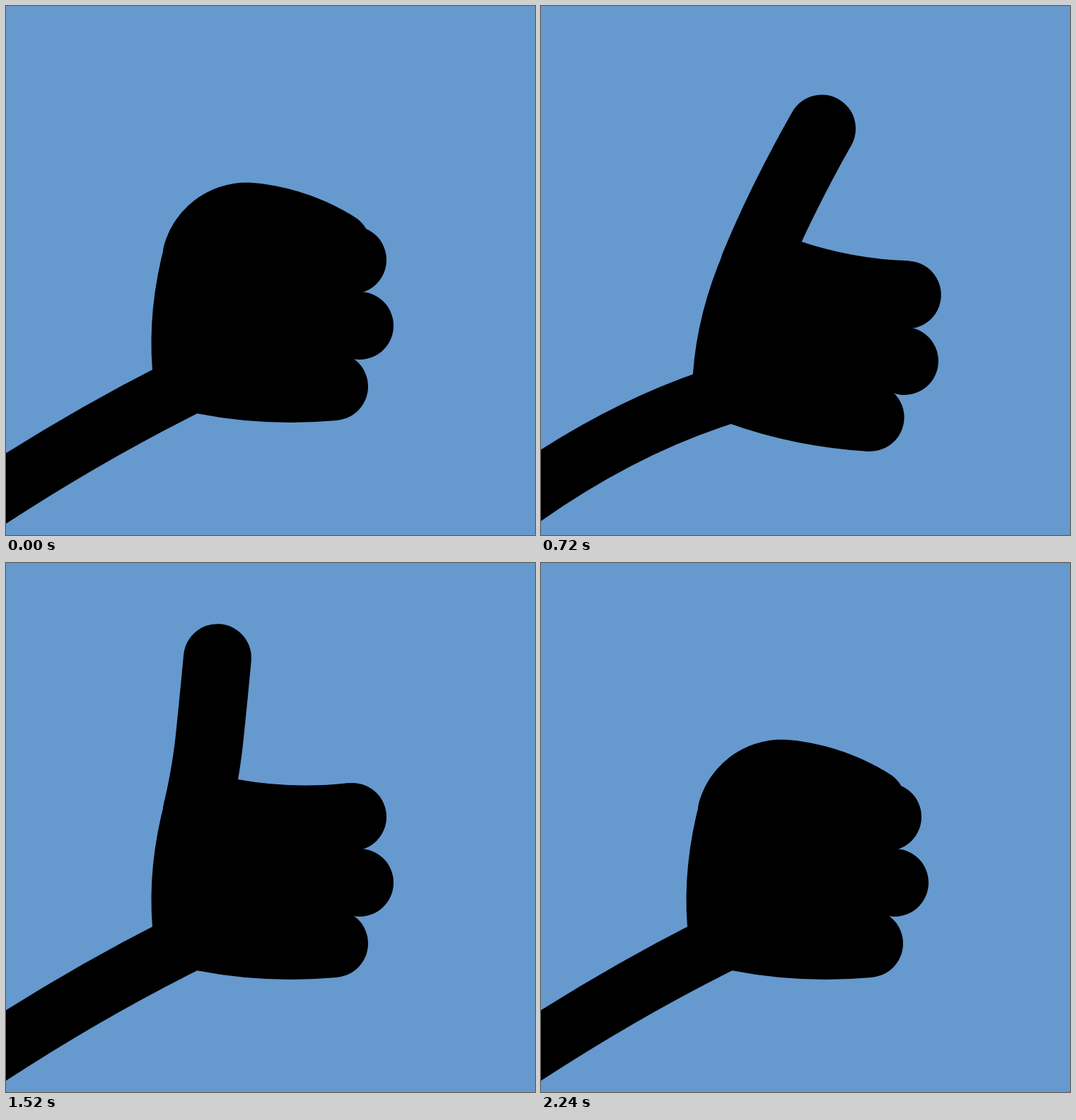
An HTML page with a canvas for the animation above (2280 ms loop, 748 by 748 pixels).

```html
<!DOCTYPE html>
<html lang="en">
<head>
<meta charset="utf-8">
<title>Thumbs up</title>
<style>
html, body { margin: 0; height: 100%; overflow: hidden; background: #6699ce; }
canvas { display: block; width: 100vw; height: 100vh; }
</style>
</head>
<body>
<canvas id="stage" width="748" height="748"></canvas>
<script>
const ctx = document.getElementById('stage').getContext('2d');
const LOOP = 2280, STEP = 40, RAD = Math.PI / 180;
const PIVOT = [240, 545];

// time, wrist x, wrist y, hand angle, arm bow
const hand = [
  [160, 240, 545, 0, 14],
  [320, 232, 536, 7.1, 7.5],
  [520, 238, 540, -8, -13],
  [720, 243, 555.5, 8.5, 35],
  [760, 244.5, 558, 9.3, 38],
  [920, 239, 541, -5.5, 4],
  [1000, 239, 544, -4, 8],
  [1240, 240, 545, 0, 14],
  [1540, 240, 545, 0, 14],
  [1740, 244, 558, 9.3, 40],
  [1880, 240.5, 547.5, -0.9, 31],
  [1980, 238, 540, -6.3, 6],
  [2120, 241, 546, 1.2, 17],
  [2240, 240, 545, 0, 14]
];

// time, thumb fold: 1 is a fist, 0 is thumb up, below 0 bends back
const thumb = [
  [340, 1], [520, -0.15], [640, 0], [1440, 0],
  [1520, -0.155], [1560, -0.17], [1720, 1]
];

// Smooth curve through the keys that never overshoots them
function sample(keys, col, t) {
  const last = keys.length - 1;
  if (t <= keys[0][0]) return keys[0][col];
  if (t >= keys[last][0]) return keys[last][col];
  const i = keys.findIndex(k => k[0] > t) - 1;
  const slope = j => j < 0 || j >= last ? 0 :
    (keys[j + 1][col] - keys[j][col]) / (keys[j + 1][0] - keys[j][0]);
  const tangent = j => {
    const a = slope(j - 1), b = slope(j);
    return a * b > 0 ? 2 * a * b / (a + b) : 0;
  };
  const span = keys[i + 1][0] - keys[i][0];
  const u = (t - keys[i][0]) / span, v = 1 - u;
  return v * v * (1 + 2 * u) * keys[i][col] + u * u * (3 - 2 * u) * keys[i + 1][col] +
    span * u * v * (v * tangent(i) - u * tangent(i + 1));
}

function drawArm(x, y, bow) {
  const sx = -80, sy = 735;
  const cx = (sx + x) / 2, cy = (sy + y) / 2 - bow;
  const len = Math.hypot(x - cx, y - cy);
  ctx.lineWidth = 84;
  ctx.lineCap = 'butt';
  ctx.beginPath();
  ctx.moveTo(sx, sy);
  ctx.quadraticCurveTo(cx, cy, x, y);
  ctx.lineTo(x + (x - cx) / len * 22, y + (y - cy) / len * 22);
  ctx.stroke();
}

function drawPalm() {
  ctx.fill(new Path2D('M207 515Q200 428 225 335L328 306Q405 320 485 311' +
    'L490 359 500 452 464 538 468 586Q365 595 269 576Z'));
  for (const [x, y] of [[490, 359], [500, 452], [464, 538]]) {
    ctx.beginPath();
    ctx.arc(x, y, 48, 0, 7);
    ctx.fill();
  }
}

// The thumb is a hose of fixed width: its heading changes evenly in two parts
function drawThumb(fold) {
  const bend = Math.abs(fold), n = 16;
  const parts = [
    [108 - 6 * bend, 14 + 3 * fold, 18 + 78 * fold],
    [108 + 19 * bend, 18 + 78 * fold, 21 + 101 * fold]
  ];
  let x = 270, y = 350;
  ctx.lineWidth = 96;
  ctx.lineCap = ctx.lineJoin = 'round';
  ctx.beginPath();
  ctx.moveTo(x, y);
  for (const [len, from, to] of parts) {
    for (let i = 0; i < n; i++) {
      const a = (from + (to - from) * (i + 0.5) / n) * RAD;
      x += len / n * Math.sin(a);
      y -= len / n * Math.cos(a);
      ctx.lineTo(x, y);
    }
  }
  ctx.stroke();
}

function draw(t) {
  const [x, y, angle, bow] = [1, 2, 3, 4].map(c => sample(hand, c, t));
  ctx.fillStyle = '#6699ce';
  ctx.fillRect(0, 0, 748, 748);
  ctx.fillStyle = ctx.strokeStyle = '#000';
  drawArm(x - 2, y + 0.5, bow);
  ctx.save();
  ctx.translate(x, y);
  ctx.rotate(angle * RAD);
  ctx.translate(-PIVOT[0], -PIVOT[1]);
  drawPalm();
  drawThumb(sample(thumb, 1, t));
  ctx.restore();
}

const start = performance.now();
function tick() {
  const t = (performance.now() - start) % LOOP;
  draw(Math.floor(t / STEP) * STEP);
  requestAnimationFrame(tick);
}
tick();
</script>
</body>
</html>
```
